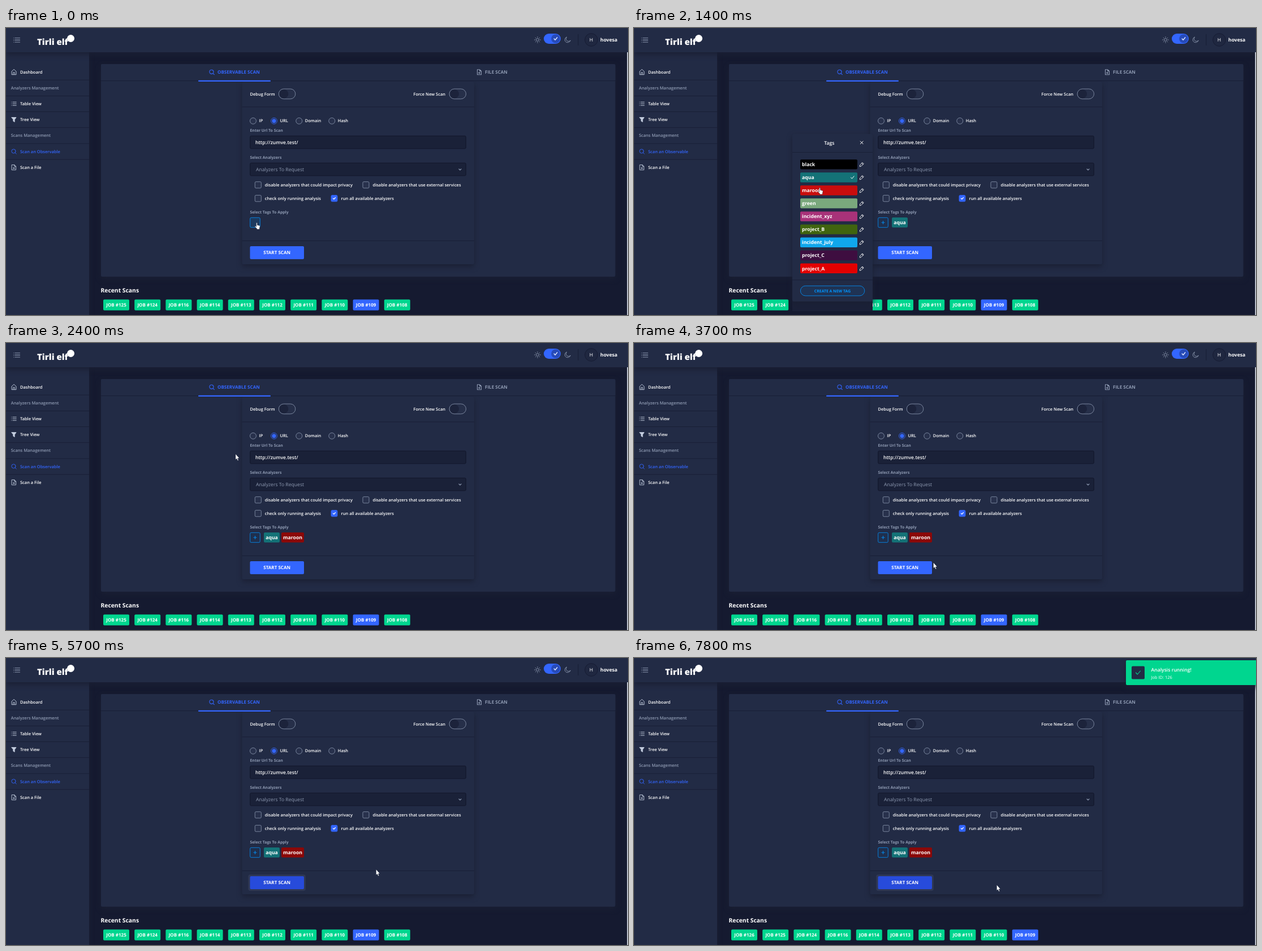
Write an HTML page that moves like this. It is 1100 px wide and 509 px high and loops after 8 s.

```html
<!DOCTYPE html>
<html lang="en">
<head>
<meta charset="utf-8">
<title>Scan form</title>
<style>
html, body { margin: 0; width: 100%; height: 100%; overflow: hidden; background: #151a30; }
svg { display: block; width: 100%; height: 100%; font-family: "Open Sans", sans-serif; }
text { white-space: pre; text-rendering: geometricPrecision; }
.shadow { filter: drop-shadow(0 4.6px 4.6px #1a1f33); }
</style>
</head>
<body>
<svg id="stage" viewBox="0 0 1100 509"></svg>
<script>
const LOOP = 8000;
const PANEL = '#222b45', DARK = '#151a30', FIELD = '#1a2138', GREY = '#8f9bb3',
      BLUE = '#3366ff', INFO = '#0095ff', GREEN = '#00d68f', WHITE = '#fff';
// Font sizes of the interface, by role
const TINY = 6.9, SMALL = 7.48, CAPS = 8.05, BODY = 8.62, TITLE = 10.35;

const rect = (x, y, w, h, fill, extra = '') =>
  `<rect x="${x}" y="${y}" width="${w}" height="${h}" fill="${fill}" ${extra}/>`;
const circle = (x, y, r, fill, extra = '') =>
  `<circle cx="${x}" cy="${y}" r="${r}" fill="${fill}" ${extra}/>`;
const label = (x, middle, str, size = SMALL, fill = WHITE, weight = 600, anchor = 'start') =>
  `<text x="${x}" y="${middle + size * .36}" font-size="${size}" fill="${fill}" font-weight="${weight}" text-anchor="${anchor}">${str}</text>`;
const icon = (x, y, d, color = WHITE, width = .9, fill = 'none') =>
  `<path transform="translate(${x} ${y})" d="${d}" fill="${fill}" stroke="${color}" stroke-width="${width}" stroke-linecap="round" stroke-linejoin="round"/>`;
const group = (id, content, extra = '') => `<g id="${id}" ${extra}>${content}</g>`;
const border = (color, rx = 2, width = .8) => `rx="${rx}" stroke="${color}" stroke-width="${width}"`;

const SHAPE = {
  home: 'M-4 4.3V-1L0-4.7 4-1V4.3ZM-1.3 4.3V.8H1.3V4.3',
  list: 'M-4.2-3h.1M-4.2 0h.1M-4.2 3h.1M-2-3H4.2M-2 0H4.2M-2 3H4.2',
  funnel: 'M-4-4H4L1.2 0V4L-1.2 2.6V0Z',
  search: 'M2.3 2.3L4.3 4.3M3.1-.5A3.6 3.6 0 1 1-4.1-.5 3.6 3.6 0 1 1 3.1-.5',
  file: 'M-3.5-4.5H.8L3.5-1.8V4.5H-3.5ZM.8-4.5V-1.8H3.5M-1.4 1.3H1.4M0-.1V2.7',
  check: 'M-2.8 0L-.8 2.2 2.8-2.2',
  tick: 'M-2 0L-.6 1.4 2-1.5',
  chevron: 'M-2-1L0 1 2-1',
  plus: 'M-2.6 0H2.6M0-2.6V2.6',
  cross: 'M-2.4-2.4L2.4 2.4M2.4-2.4L-2.4 2.4',
  pencil: 'M-3.4 3.4L-3 .9 1.3-3.4 3.4-1.3-.9 3ZM.2-2.3L2.3-.2',
  moon: 'M5 1.4A5 5 0 1 1-1.2-5 4.1 4.1 0 0 0 5 1.4Z',
  hand: 'M2.6 1.1C2.6-.1 4.3-.1 4.3 1.1V4.4L8 5.3C9 5.6 9.2 6.3 9 7.3L8.3 10.3V12H3.6V10.8L.4 7.4C-.2 6.5.8 5.8 1.5 6.4L2.6 7.3Z',
  arrow: 'M0 0V9.8L2.1 8.1 3.7 11.6 5.2 10.9 3.7 7.6 6.4 7.3Z'
};

function sidebar() {
  const items = [['Dashboard', 'home'], ['Analyzers Management'], ['Table View', 'list'], ['Tree View', 'funnel'],
                 ['Scans Management'], ['Scan an Observable', 'search'], ['Scan a File', 'file']];
  const rows = items.map(([name, shape], i) => {
    const y = 78 + i * 28.2, color = i === 5 ? BLUE : shape ? WHITE : GREY;
    const mark = color === WHITE ? '#c5cee0' : color;
    return (shape ? icon(14, y, SHAPE[shape], mark, .9, shape === 'funnel' ? mark : 'none') : '') +
      label(shape ? 25 : 8.7, y, name, SMALL, color) +
      (i < 6 ? rect(0, y + 13.8, 147, .7, DARK) : '');
  });
  return rect(0, 43, 147, 466, PANEL, 'class="shadow"') + rows.join('');
}

function header() {
  const rays = Array.from({ length: 8 }, (_, i) => {
    const c = Math.cos(i * Math.PI / 4), s = Math.sin(i * Math.PI / 4);
    return `M${4.2 * c} ${4.2 * s}L${5.4 * c} ${5.4 * s}`;
  }).join('');
  return rect(0, 0, 1100, 43, PANEL, 'class="shadow"') +
    icon(19, 21.4, 'M-5.5-3.6h.1M-5.5 0h.1M-5.5 3.6h.1M-3.2-3.6H5.5M-3.2 0H5.5M-3.2 3.6H5.5', GREY, 1.1) +
    label(55, 24.5, 'Tirli elf', 15, WHITE, 800) + circle(114.5, 18.5, 6.5, WHITE) +
    circle(940, 21, 2.4, 'none', `stroke="${GREY}" stroke-width=".9"`) + icon(940, 21, rays, GREY) +
    rect(951, 10, 30, 18, BLUE, 'rx="9"') + circle(972, 19, 7.8, '#274bb8') + icon(972, 19, SHAPE.check, '#dfe7ff', 1.4) +
    icon(993, 21, SHAPE.moon, GREY) + rect(1011.5, 11, .8, 20, DARK) +
    circle(1035, 21, 11.3, '#1f2740', `stroke="${DARK}" stroke-width=".8"`) +
    label(1035, 21.3, 'H', BODY, WHITE, 400, 'middle') + label(1051, 21.3, 'hovesa', BODY, WHITE, 700);
}

const toggle = x => rect(x, 108, 29.5, 17.8, '#262f49', border(GREY, 8.9)) + circle(x + 9, 116.9, 8, '#1c233b');
const radio = (x, name, on) =>
  circle(x, 164.8, 5.5, '#28314c', `stroke="${on ? BLUE : GREY}" stroke-width=".8"`) +
  (on ? circle(x, 164.8, 3.6, BLUE) : '') + label(x + 10.5, 164.8, name);
const checkbox = (x, y, name, on) =>
  rect(x, y - 5.6, 11, 11.2, on ? BLUE : '#28314c', border(on ? BLUE : GREY, 1.8)) +
  (on ? icon(x + 5.5, y, SHAPE.tick, WHITE, 1.3) : '') + label(x + 17.5, y, name);
const field = y => rect(431.7, y, 381.6, 22.6, FIELD, border('#101426'));
const tag = (x, w, name, fill) => rect(x, 336, w, 17.8, fill, 'rx="2"') + label(x + w / 2, 345, name, 8.7, WHITE, 700, 'middle');

function form() {
  return rect(168, 64, 909.5, 377, PANEL, 'rx="2" class="shadow"') +
    rect(417.5, 95, 410.5, 324, PANEL, 'rx="2" class="shadow"') +
    rect(168, 64, 909.5, 29.5, PANEL, 'rx="2"') + rect(168, 93.4, 909.5, .7, DARK) +
    rect(340, 92.8, 128, 2.3, BLUE, 'rx="1"') +
    icon(364, 78.3, SHAPE.search, BLUE, 1.1) + label(374, 78.3, 'OBSERVABLE SCAN', CAPS, BLUE, 700) +
    icon(837, 78.3, SHAPE.file, GREY, 1.1) + label(847, 78.3, 'FILE SCAN', CAPS, GREY, 700) +
    label(431.5, 117, 'Debug Form') + toggle(482.3) + label(720.5, 117, 'Force New Scan') + toggle(784) +
    rect(417.5, 139.6, 410.5, .7, DARK) + rect(417.5, 376.9, 410.5, .7, DARK) +
    radio(437, 'IP') + radio(474, 'URL', true) + radio(518.3, 'Domain') + radio(576.3, 'Hash') +
    label(431.5, 182, 'Enter Url To Scan', TINY, GREY, 700) + field(191.4) + label(441, 203, 'http://zumve.test/', BODY) +
    label(431.5, 230, 'Select Analyzers', TINY, GREY, 700) + field(239.4) +
    label(442, 251, 'Analyzers To Request', BODY, GREY, 400) + icon(803, 251, SHAPE.chevron, GREY, 1.1) +
    checkbox(440.3, 278.3, 'disable analyzers that could impact privacy') +
    checkbox(631, 278.3, 'disable analyzers that use external services') +
    checkbox(440.3, 302.2, 'check only running analysis') +
    checkbox(575, 302.2, 'run all available analyzers', true) +
    label(431.5, 326.2, 'Select Tags To Apply', TINY, GREY, 700) +
    group('addRing', rect(429.8, 334.4, 21.2, 21.2, '#2e3a59', 'rx="3"')) +
    rect(431.7, 336.3, 17.6, 17.4, '#1f334f', `id="add" ${border(INFO)}`) +
    group('plus', icon(440.5, 345, SHAPE.plus, INFO)) +
    group('aquaTag', tag(456, 28, 'aqua', '#147277')) + group('maroonTag', tag(487, 40, 'maroon', '#8b0808')) +
    group('startRing', rect(428.3, 384, 101.6, 29, '#2f3854', 'rx="4"')) +
    rect(431.5, 387, 95.5, 23, BLUE, 'id="start" rx="2"') +
    label(479.2, 398.5, 'START SCAN', CAPS, WHITE, 700, 'middle');
}

const JOBS = [126, 125, 124, 116, 114, 113, 112, 111, 110, 109, 108];
const jobRow = first => JOBS.slice(first, first + 10).map((id, i) => {
  const x = 172 + i * 55.2;
  return rect(x, 481.4, 46, 19.4, id === 109 ? BLUE : GREEN, 'rx="2"') +
    label(x + 23, 491.2, `JOB #${id}`, CAPS, WHITE, 700, 'middle');
}).join('');

const TAGS = [['black', '#000'], ['aqua', '#147277'], ['maroon', '#8b0808'], ['green', '#7aa87d'], ['incident_xyz', '#a83279'],
              ['project_B', '#40640f'], ['incident_july', '#10a7ec'], ['project_C', '#3e0e40'], ['project_A', '#e20000']];

function popover() {
  const rows = TAGS.map(([name, fill], i) => {
    const y = 242 + i * 23.05;
    return rect(294, y - 8.8, 101, 17.4, fill, `rx="2" id="row${i}"`) + label(297, y, name, 8.7, WHITE, 700) +
      icon(402.7, y, SHAPE.pencil);
  });
  return rect(280, 480, 142, 22, '#1b2138') +
    rect(280, 188, 142, 297, PANEL, 'rx="2" class="shadow"') +
    label(345.3, 204.3, 'Tags', BODY, WHITE, 600, 'middle') + icon(402.7, 203.3, SHAPE.cross, WHITE, 1) +
    rect(280, 220.3, 142, .7, DARK) + rect(280, 446.5, 142, .7, DARK) + rows.join('') +
    group('aquaCheck', icon(386.3, 265, SHAPE.check, WHITE, 1)) + group('maroonCheck', icon(386.3, 288, SHAPE.check, WHITE, 1)) +
    rect(294.4, 457.3, 113.4, 17.6, '#1f3354', border(INFO, 8.8)) +
    label(351, 466.2, 'CREATE A NEW TAG', TINY, INFO, 700, 'middle');
}

const toast = () => rect(870, 4, 232, 44, GREEN, 'rx="2" class="shadow"') +
  rect(880, 14.5, 23, 23, PANEL, 'rx="2"') + icon(891.5, 26, 'M-4 0L-1.2 3 4-3', GREEN, 1.1) +
  label(914.5, 21, 'Analysis running!', BODY) + label(914.5, 34, 'Job ID: 126', SMALL, WHITE, 400);

document.getElementById('stage').innerHTML =
  rect(0, 0, 1100, 509, DARK) + form() +
  label(167.5, 465.5, 'Recent Scans', TITLE, WHITE, 700) +
  group('jobsBefore', jobRow(1)) + group('jobsAfter', jobRow(0)) +
  sidebar() + header() + rect(1098.5, 43, 1.5, 466, '#e4e9f2') +
  group('popover', popover()) + group('toast', toast()) +
  rect(0, 0, 0, 1.6, BLUE, 'id="progress"') +
  group('pointer', group('hand', icon(0, 0, SHAPE.hand, '#1a2138', .5, WHITE)) +
    group('arrow', icon(0, 0, SHAPE.arrow, '#1a2138', .4, WHITE)));

const el = id => document.getElementById(id);
const show = (id, on) => el(id).setAttribute('visibility', on ? 'visible' : 'hidden');

// time, x, y of the pointer's upper left corner
const POINTER = [[0, 440, 345], [500, 440, 345], [600, 366.5, 354.5], [1300, 333, 262], [1400, 325, 283],
  [1600, 325, 283], [1900, 399, 198], [2300, 399, 198], [2400, 406, 197], [2800, 831, 154], [3600, 831, 154],
  [3700, 529.5, 389.5], [3800, 529.5, 389.5], [3900, 455, 397], [4100, 455, 397], [4200, 638, 348], [4400, 638, 348],
  [4500, 650, 371], [4600, 654.5, 375], [7500, 654.5, 375], [7600, 692, 373], [7700, 692, 373], [7800, 641.5, 402.5]];
const PROGRESS = [[0, 0], [4500, 60], [4600, 103], [4800, 142], [5000, 206], [5200, 250], [5300, 293], [5500, 345], [5700, 0]];

function pointerAt(t) {
  const i = POINTER.findLastIndex(k => k[0] <= t);
  const [t0, x0, y0] = POINTER[i], [t1, x1, y1] = POINTER[i + 1] || [LOOP, x0, y0];
  const p = (t - t0) / (t1 - t0);
  return [x0 + (x1 - x0) * p, y0 + (y1 - y0) * p];
}

function draw(time) {
  const t = Math.floor(time % LOOP / 100) * 100;
  const between = (a, b) => t >= a && t < b;

  show('popover', between(500, 2300));
  show('aquaCheck', between(1400, 2300));
  show('maroonCheck', between(1600, 2300));
  show('aquaTag', t >= 1400);
  show('maroonTag', t >= 1600);
  el('row2').setAttribute('fill', between(1400, 1700) ? '#c90d0d' : TAGS[2][1]);

  show('plus', t >= 500);
  show('addRing', between(500, 1400));
  el('add').setAttribute('fill', t < 500 ? '#1d3a5f' : '#1f2f4d');

  show('startRing', t >= 4200);
  el('start').setAttribute('fill', between(3900, 4200) ? '#598bff' : t >= 4200 ? '#274bdb' : BLUE);
  el('progress').setAttribute('width', PROGRESS.findLast(k => k[0] <= t)[1]);

  show('jobsBefore', t < 7200);
  show('jobsAfter', t >= 7200);
  show('toast', t >= 7200);
  el('toast').setAttribute('opacity', t < 7300 ? .5 : 1);

  const hand = t < 2300 || between(3900, 4200);
  show('hand', hand);
  show('arrow', !hand);
  el('pointer').setAttribute('transform', `translate(${pointerAt(t)})`);
}

const start = performance.now();
function tick() {
  draw(performance.now() - start);
  requestAnimationFrame(tick);
}
tick();
</script>
</body>
</html>
```
